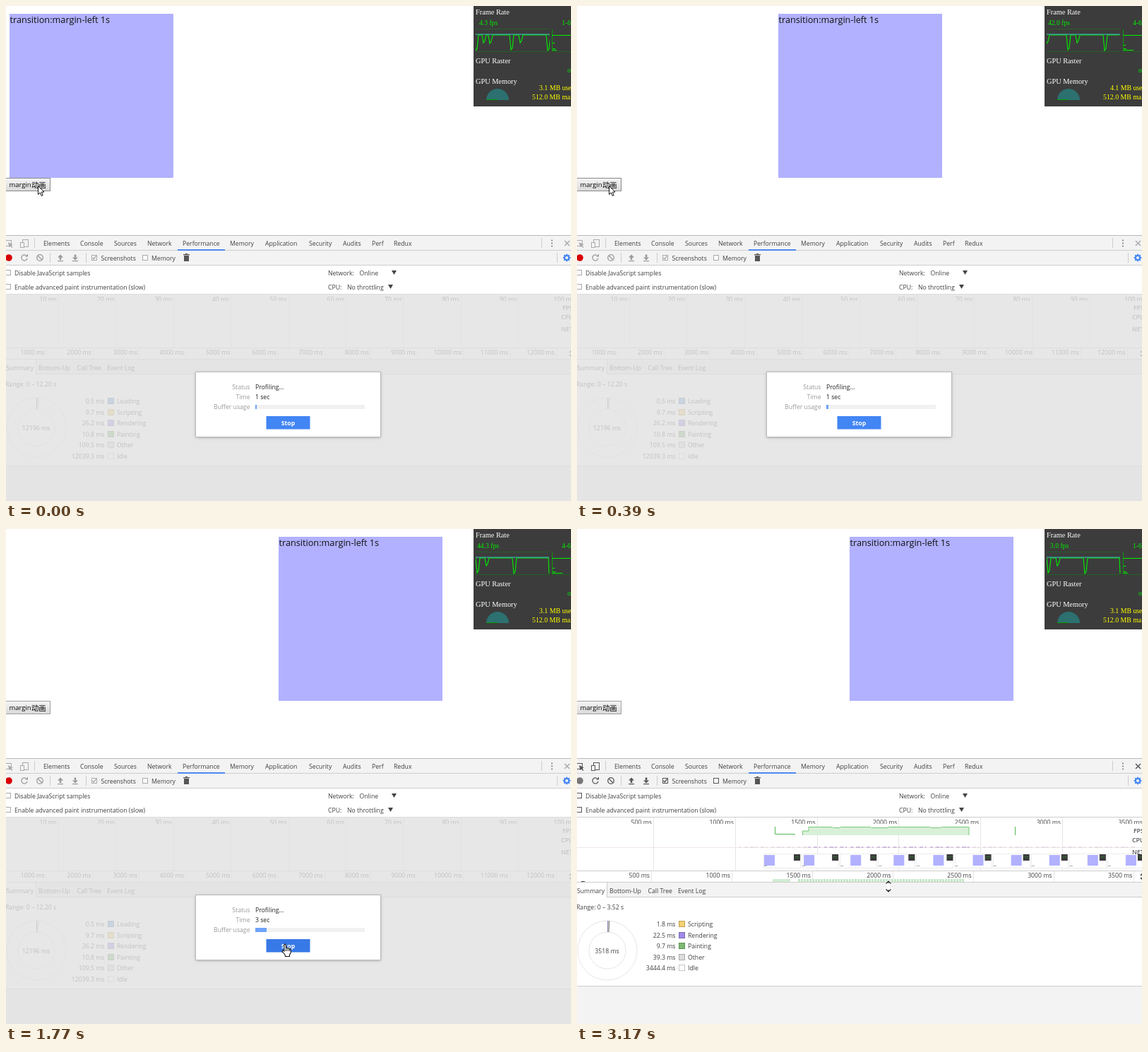
An HTML page with a canvas that plays this animation: 800x700 px, repeating every 4.83 s.

```html
<!DOCTYPE html>
<html lang="en">
<head>
<meta charset="utf-8">
<title>Margin transition profile</title>
<style>
  html, body { margin: 0; width: 100%; height: 100%; overflow: hidden; background: #fff; }
  canvas { display: block; }
</style>
</head>
<body>
<canvas id="stage" width="800" height="700"></canvas>
<script>
const ctx = document.getElementById('stage').getContext('2d');
const LOOP = 4830;
const UI = '"Open Sans", "Noto Sans CJK SC", "Noto Sans CJK", sans-serif';
const SERIF = '"Liberation Serif", serif';
const INK = '#404040', BAR = '#f3f3f3', LINE = '#cdcdcd', BLUE = '#4285f4', GREEN = '#00f000';

// Screen updates: time, box x, pointer x, pointer y, frame graph scroll
const steps = [
  [0, 5, 45, 254, 0], [120, 69, 45, 254, 5], [270, 210, 45, 254, 14],
  [390, 285, 45, 254, 20], [510, 332, 45, 254, 26], [650, 366, 45, 254, 33],
  [780, 380, 45, 254, 39], [900, 385, 45, 254, 44], [1050, 386, 45, 254, 48],
  [1200, 386, 107, 300, 48], [1320, 386, 198, 377, 48], [1470, 386, 367, 512, 48],
  [1620, 386, 389, 566, 48], [1770, 386, 391, 587, 48], [2190, 386, 420, 556, 48],
  [2310, 386, 449, 508, 48], [2460, 386, 441, 505, 48], [3170, 386, 441, 505, 48]
];

function rect(x, y, w, h, color) {
  ctx.fillStyle = color;
  ctx.fillRect(x, y, w, h);
}
function frame(x, y, w, h, color) {
  ctx.strokeStyle = color;
  ctx.lineWidth = 1;
  ctx.strokeRect(x + .5, y + .5, w - 1, h - 1);
}
function text(str, x, y, color = INK, size = 8.7, align = 'left', family = UI, weight = '') {
  ctx.font = `${weight} ${size}px ${family}`;
  ctx.textAlign = align;
  ctx.fillStyle = color;
  ctx.fillText(str, x, y);
}
function path(points, stroke, width = 1, fill, close) {
  ctx.beginPath();
  for (let i = 0; i < points.length; i += 2) ctx.lineTo(points[i], points[i + 1]);
  if (close) ctx.closePath();
  if (fill) { ctx.fillStyle = fill; ctx.fill(); }
  if (stroke) { ctx.strokeStyle = stroke; ctx.lineWidth = width; ctx.stroke(); }
}
function circle(x, y, r, stroke, fill, width = 1, from = 0, to = Math.PI * 2) {
  ctx.beginPath();
  ctx.arc(x, y, r, from, to);
  if (fill) { ctx.fillStyle = fill; ctx.fill(); }
  if (stroke) { ctx.strokeStyle = stroke; ctx.lineWidth = width; ctx.stroke(); }
}
function clipped(x, y, w, h, draw) {
  ctx.save();
  ctx.beginPath();
  ctx.rect(x, y, w, h);
  ctx.clip();
  draw();
  ctx.restore();
}

function drawPage(t, boxX) {
  rect(boxX, 11, 232, 232, '#b1b1ff');
  text('transition:margin-left 1s', boxX + .5, 24, '#111', 12.7);
  const face = ctx.createLinearGradient(0, 244, 0, 261);
  face.addColorStop(0, '#f4f4f4');
  face.addColorStop(1, '#dadada');
  rect(0, 244, 62, 17, face);
  frame(-1, 243, 64, 19, t < 1200 ? '#8a8a8a' : '#a0a0a0');
  text('margin', 4.5, 256, '#000', 9.4);
  text('动画', 36, 256.5, '#000', 10.3);
}

function drawMeter(t, scroll) {
  const busy = t >= 120 && t < 2040;
  const fps = t < 120 ? '4.3' : t < 270 ? '36.8' : t < 510 ? '42.0' : t < 1200 ? '48.3' : busy ? '44.3' : '3.0';
  const memory = t >= 120 && t < 1200 ? '4.1' : '3.1';
  rect(662, 0, 138, 142, '#3c3c3c');
  text('Frame Rate', 665, 12, '#fff', 10.3, 'left', SERIF);
  text(fps + ' fps', busy ? 667 : 670, 27, GREEN, 9.6, 'left', SERIF);
  text(busy ? '4-60' : '1-60', 787, 27, GREEN, 9.6, 'left', SERIF);

  rect(665, 32, 104, 1, '#246024');
  rect(665, 64, 104, 1, '#246024');
  clipped(665, 33, 105, 32, () => {
    const dips = [[666, 63], [677, 52], [686, 53], [716, 62], [729, 52], [768, 63]];
    const line = [600, 41];
    for (const [x, y] of dips) line.push(x - scroll - 3, 41, x - scroll - 1, y, x - scroll + 1, y - 3, x - scroll + 3, 41);
    line.push(768, 41);
    if (t >= 1200) line.push(769, 63);
    path(line, GREEN, 1.1);
    rect(665, 39.5, 104, 1.2, '#36bda5');
  });
  rect(773, 33, 1, 31, '#0a9a0a');
  rect(773, 41, 27, 1, GREEN);
  rect(773, 64, 27, 1, '#246024');
  rect(774, busy ? 55 : 52, 3, 1, GREEN);
  rect(774, 60, 4, 1, GREEN);
  rect(774, 62, busy ? 14 : 6, 1, GREEN);

  text('GPU Raster', 665, 81, '#fff', 10.3, 'left', SERIF);
  text('on', 795, 94, GREEN, 9.6, 'left', SERIF);
  text('GPU Memory', 665, 110, '#fff', 10.3, 'left', SERIF);
  circle(696, 133, 16, null, '#2c7070', 1, Math.PI, 0);
  path([680, 132.5, 696, 132.5], '#00a000', 1);
  text(memory + ' MB used', 755, 119, '#ff0', 9.8, 'left', SERIF);
  text('512.0 MB max', 745, 131.5, '#ff0', 9.8, 'left', SERIF);
}

function checkbox(x, y, color, checked) {
  rect(x, y, 8, 8, '#fafafa');
  frame(x, y, 8, 8, color);
  if (checked) path([x + 1.5, y + 4, x + 3.3, y + 6, x + 6.5, y + 1.5], color, 1.4);
}
function drawArrowIcon(x, dir, color) {
  path([x - 4, 355.5, x, 355.5 + dir * 4, x + 4, 355.5], null, 0, color, true);
  rect(x - 1.3, dir < 0 ? 355 : 351.5, 2.6, 4, color);
  rect(x - 4, 360, 8, 1.2, color);
}

function drawToolbars(t) {
  const stopped = t >= 2190, done = t >= 3170;
  const edge = stopped ? '#555' : '#aaa', icon = done ? '#555' : '#999';
  rect(0, 324, 800, 43, BAR);
  rect(0, 324, 800, 1, '#b8b8b8');
  rect(0, 345, 800, 1, LINE);
  rect(0, 366, 800, 1, LINE);

  frame(-2, 331, 10, 9, edge);
  path([3, 334, 10, 337.5, 7, 338.3, 9.5, 341, 8.4, 342, 5.8, 339.2, 4.5, 341.5], null, 0, edge, true);
  frame(23, 330, 9, 11, edge);
  rect(20, 334, 6, 8, BAR);
  frame(20, 334, 6, 8, edge);
  const tabs = { Elements: 53, Console: 105, Sources: 153, Network: 200, Performance: 250, Memory: 317,
    Application: 367, Security: 429, Audits: 477, Perf: 518, Redux: 549 };
  for (const name in tabs) text(name, tabs[name], 339);
  rect(243, 344, 67, 2, '#4d8af0');
  for (const [x, y] of [[40, 328], [758, 328], [62, 349], [113, 349], [780, 349]]) rect(x, y, 1, 14, LINE);
  for (const y of [331.5, 335.5, 339.5]) circle(773, y, 1, null, '#777');
  path([791, 332, 798, 339], edge, 1.5);
  path([798, 332, 791, 339], edge, 1.5);

  circle(4, 356, 4.8, null, stopped ? '#777' : '#d80000');
  circle(26, 356, 4, icon, null, 1.3, .2, 5.3);
  path([27, 354.5, 31, 354.5, 31, 350.5], null, 0, icon, true);
  circle(48, 356, 4.3, icon, null, 1.3);
  path([45, 353, 51, 359], icon, 1.3);
  drawArrowIcon(77, -1, icon);
  drawArrowIcon(98, 1, icon);
  checkbox(121, 352, edge, true);
  text('Screenshots', 134.5, 360);
  checkbox(193, 352, edge);
  text('Memory', 206, 360);
  rect(252, 353, 7, 8, '#555');
  rect(251, 351, 9, 1.3, '#555');
  rect(254, 350, 3, 1, '#555');
  for (let i = 0; i < 4; i++) {
    const dx = 5.3 * Math.cos(i * Math.PI / 4), dy = 5.3 * Math.sin(i * Math.PI / 4);
    path([794 - dx, 356 - dy, 794 + dx, 356 + dy], BLUE, 2);
  }
  circle(794, 356, 3.1, BLUE, BAR, 2);

  rect(0, 367, 800, 40, '#fff');
  checkbox(-1, 373, edge);
  checkbox(-1, 393, edge);
  text('Disable JavaScript samples', 12, 381);
  text('Enable advanced paint instrumentation (slow)', 12, 401);
  text('Network:', 456, 381);
  text('Online', 500.5, 381);
  text('CPU:', 456, 401);
  text('No throttling', 483, 401);
  path([546, 374, 553, 374, 549.5, 380], null, 0, '#444', true);
  path([541, 394, 548, 394, 544.5, 400], null, 0, '#444', true);
  rect(0, 407, 800, 1, LINE);
}

function ruler(first, gap, unit, baseline, gridTop, gridBottom) {
  for (let i = 0; first + i * gap < 840; i++) {
    const x = first + i * gap;
    rect(Math.round(x + 2), gridTop, 1, gridBottom - gridTop, '#e6e6e6');
    text((i + 1) * unit + ' ms', x, baseline, INK, 8.7, 'right');
  }
}

function drawOverview() {
  path([280.5, 421, 280.5, 431.5, 308, 431.5, 308, 433], '#55b855');
  path([319.5, 433, 319.5, 427, 328, 427, 328, 421.5, 362, 421.5, 363, 422.5, 372, 422.5, 373, 421.5,
    416, 421.5, 417, 422.5, 440, 422.5, 441, 421.5, 500, 421.5, 501, 422.5, 515, 422.5, 516, 421.5,
    555, 421.5, 555, 433], '#78c878', 1, '#d8f0d8');
  rect(620, 421, 1, 12, '#55b855');
  rect(0, 450, 800, 1, '#eee4ee');
  for (let i = 0; i < 75; i++) rect(230 + i * 7.5, 449.5, 2 + i * 7 % 5, 1, i > 12 && i < 44 ? '#a68bc0' : '#d8cbd5');
  const shifts = [1, 3, 15, 22, 24];
  for (let i = 0; i < 10; i++) {
    const x = 264 + 54.1 * i;
    rect(x, 460, 53, 20, '#fff');
    frame(Math.round(x), 459, 53, 21, '#ececec');
    rect(x + (shifts[i] ?? 26), 461, 15, 15, '#b1b1ff');
    rect(x + 43, 460, 9, 9, '#3c3c3c');
    rect(x + 45, 463, 5, 1, '#287028');
    rect(x + 1, 476, 4, 1, '#aaa');
  }
  rect(277, 495, 25, 4, '#d2ecd2');
  for (let x = 313; x < 546; x += 4) rect(x, 495, 3, 4, '#c4e6c4');
  rect(6, 498, 5, 1.5, '#444');
}

function drawResults(done) {
  rect(0, 408, 800, 292, '#fff');
  clipped(0, 408, 800, 9, () => done ? ruler(106, 115.8, 500, 418, 408, 483) : ruler(72, 81.4, 10, 418, 408, 483));
  const [first, gap] = done ? [106, 115.8] : [72, 81.4];
  for (let x = first + 2; x < 800; x += gap) rect(Math.round(x), 417, 1, 66, '#e6e6e6');
  rect(0, 483, 800, 1, LINE);
  if (done) ruler(103, 113.9, 500, 493, 484, 499);
  else ruler(55, 65.6, 1000, 493, 484, 499);
  if (done) drawOverview();
  [['FPS', 430], ['CPU', 443], ['NET', 460]].forEach(([s, y], i) => text(s, i ? 786 : 788, y, '#555', 8.7, 'left', UI, 600));
  path([797, 490, 799.5, 487, 802, 490], null, 0, '#555', true);
  path([797, 493, 799.5, 496, 802, 493], null, 0, '#555', true);

  rect(0, 499, 800, 22, BAR);
  rect(0, 499, 800, 1, LINE);
  rect(0, 520, 800, 1, LINE);
  rect(0, 500, 42, 21, '#fff');
  rect(42, 500, 1, 20, LINE);
  [['Summary', 0], ['Bottom-Up', 46], ['Call Tree', 100.5], ['Event Log', 143]].forEach(([s, x]) => text(s, x, 515));

  text(done ? 'Range: 0 – 3.52 s' : 'Range: 0 – 12.20 s', -1, 538);
  circle(43, 596, 42, '#e6e6e6');
  circle(43, 596, 26, '#e6e6e6');
  path([43, 554, 47, 554.3, 45.5, 570, 43, 570], null, 0, '#d2d2d2', true);
  path([43.5, 554, 43.5, 570], '#9184bb', 1);
  if (done) path([45.5, 554, 45, 570], '#888', 1);
  text(done ? '3518 ms' : '12196 ms', 42.5, 600, INK, 8.7, 'center');

  const colors = { Loading: '#6d9fdd', Scripting: '#f3d070', Rendering: '#a18ae8', Painting: '#7dbb70', Other: '#dcdcdc', Idle: '#fff' };
  const values = done ? ['', 1.8, 22.5, 9.7, 39.3, 3444.4] : [0.5, 9.7, 26.2, 10.8, 109.5, 12039.3];
  Object.keys(colors).slice(done ? 1 : 0).forEach((name, i) => {
    const y = 558 + i * 15.5;
    text(values[done ? i + 1 : i] + ' ms', 139.5, y + 4, INK, 8.7, 'right');
    rect(144, Math.round(y - 4), 9, 9, colors[name]);
    frame(144, Math.round(y - 4), 9, 9, 'rgba(0,0,0,.22)');
    text(name, 157, y + 4);
  });
  rect(0, done ? 646 : 650, 800, 60, BAR);
  rect(0, done ? 646 : 650, 800, 1, LINE);
}

function drawDialog(t) {
  const loading = t >= 2190;
  const top = loading ? 524 : 517, height = loading ? 79 : 93;
  rect(0, 407, 800, 293, 'rgba(225,225,225,.8)');
  ctx.save();
  ctx.shadowColor = 'rgba(0,0,0,.35)';
  ctx.shadowBlur = 4;
  ctx.shadowOffsetY = 1;
  rect(269, top + 1, 261, height - 2, '#fff');
  ctx.restore();
  frame(268, top, 263, height, '#b9b9b9');

  const row = (label, value, y) => {
    text(label, 345.5, y, '#999', 8.7, 'right');
    text(value, 353, y, '#222');
  };
  row('Status', !loading ? 'Profiling…' : t < 2890 ? 'Loading profile…' : 'Processing profile…', top + 25);
  if (!loading) row('Time', (t < 650 ? 1 : t < 1620 ? 2 : 3) + ' sec', 556);
  const barY = loading ? 557 : 564;
  row(loading ? 'Received' : 'Buffer usage', '', barY + 6);
  const filled = loading ? (t < 2890 ? 28 : 155) : t < 120 ? 2 : t < 650 ? 3 : t < 1050 ? 9.5 : 16;
  rect(353, barY, 155, 6, '#f1f1f1');
  rect(353, barY, filled, 6, '#6ea3fa');
  const buttonY = loading ? 573 : 580;
  rect(368.5, buttonY, 62, 18.5, loading ? '#b3cefb' : t >= 1770 ? '#3879e8' : BLUE);
  text('Stop', 399.5, buttonY + 13, '#fff', 8.7, 'center', UI, 700);
}

function drawPointer(t, x, y) {
  ctx.save();
  ctx.translate(x, y);
  if (t >= 3170) {
    path([0, -8, 4, -3.5, 1, -3.5, 1, 4.5, 4, 4.5, 0, 9, -4, 4.5, -1, 4.5, -1, -3.5, -4, -3.5], '#fff', 2, '#333', true);
    path([-3.5, -3.5, 0, -7, 3.5, -3.5], '#222', 1.2);
    path([-3.5, 4.5, 0, 8, 3.5, 4.5], '#222', 1.2);
  } else if (t >= 1770 && t < 2190) {
    path([3, 10, 3, 1, 4, 0, 5.5, 1, 5.5, 6, 7, 5.3, 8, 6.2, 9.5, 5.8, 10.5, 7, 12, 7.2, 12.3, 12,
      10.5, 15, 10.5, 17.5, 4.5, 17.5, 4, 15, 0, 10.5, .5, 9, 2, 9.2], '#111', 1.1, '#fff', true);
    for (const dx of [5.5, 8, 10.3]) path([dx, 7, dx, 10], '#111', 1);
  } else {
    path([.5, .5, .5, 12.5, 3.3, 10, 5.3, 14.5, 7.2, 13.6, 5.3, 9.2, 9, 9], '#111', 1, '#fff', true);
  }
  ctx.restore();
}

function draw() {
  const t = performance.now() % LOOP;
  const [, boxX, pointerX, pointerY, scroll] = steps.findLast(step => step[0] <= t);
  const done = t >= 3170;
  rect(0, 0, 800, 700, '#fff');
  drawPage(t, boxX);
  drawMeter(t, scroll);
  drawToolbars(t);
  drawResults(done);
  if (!done) drawDialog(t);
  drawPointer(t, pointerX, pointerY);
  requestAnimationFrame(draw);
}
draw();
</script>
</body>
</html>
```
